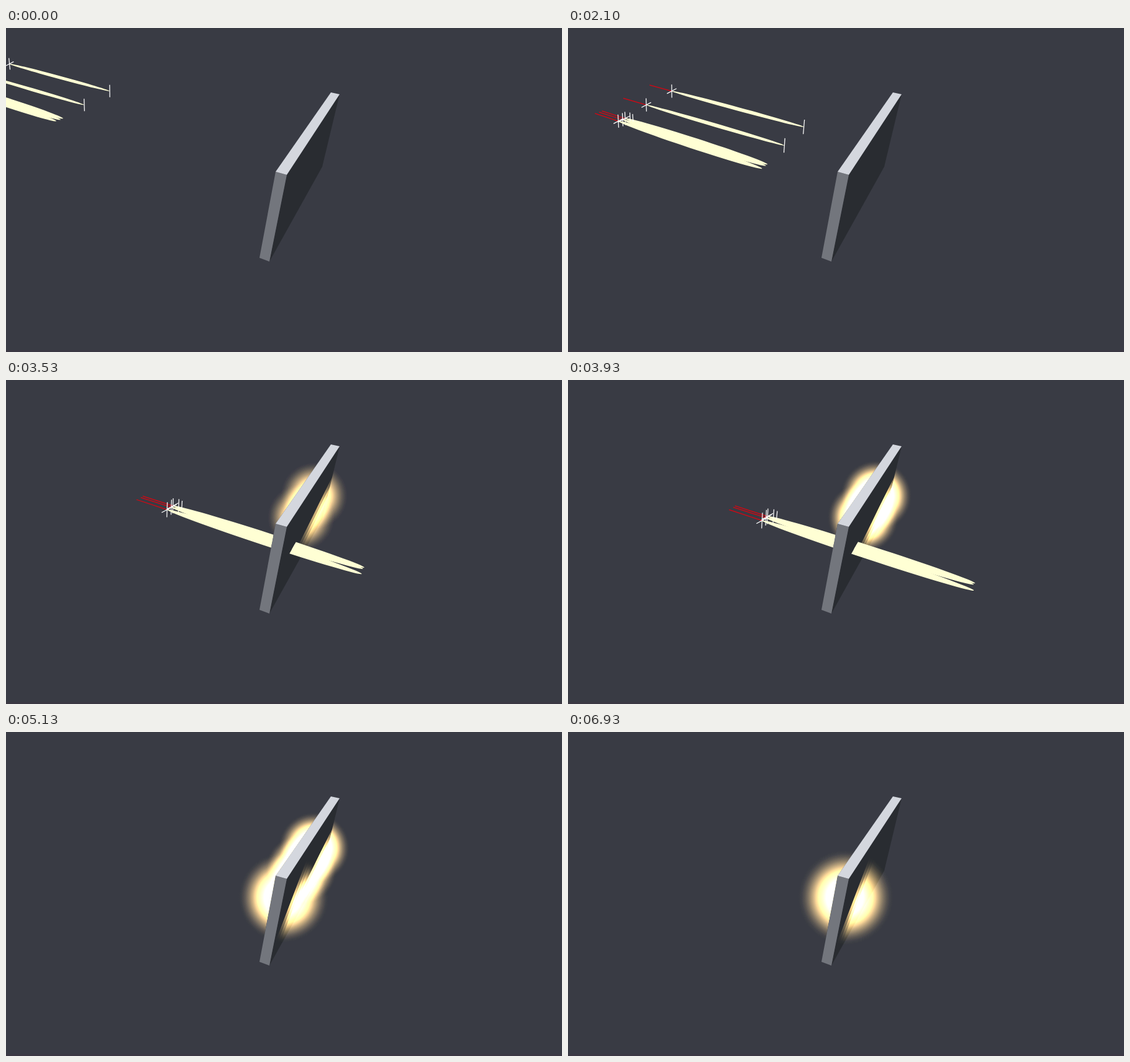
An HTML page with a canvas for the animation above (7910 ms loop, 895 by 523 pixels).

```html
<!DOCTYPE html>
<html lang="en">
<head>
<meta charset="utf-8">
<title>Beams hitting a slab</title>
<style>
  html, body { margin: 0; width: 100%; height: 100%; overflow: hidden; background: #393b44; }
  canvas { display: block; }
</style>
</head>
<body>
<canvas id="stage" width="895" height="523"></canvas>
<script>
const W = 895, H = 523, LOOP = 7910;
const ctx = document.getElementById('stage').getContext('2d');
ctx.lineWidth = 1.25;

// The simulation advances one step at each of these times (ms).
const STEPS = [0, 600, 930, 1300, 1630, 2100, 2470, 2800, 3200, 3530,
  3930, 4300, 4730, 5130, 5500, 5900, 6270, 6630, 6930];

const TOP = [[523, 104], [537, 107], [452, 237], [434, 232]];
const LEFT = [[434, 232], [452, 237], [424, 377], [408, 371]];
const RIGHT = [[452, 237], [537, 107], [509, 224], [424, 377]];
const OUTLINE = [[523, 104], [537, 107], [509, 224], [424, 377], [408, 371], [434, 232]];

// Perspective travel: x(u) = (x0 + v*u) / (1 + c*u), y = y0 + m*(x - x0).
const BEAMS = [
  { x0: 167, v: 32.13, c: -.0274, y0: 101.8, m: .272, h: 2.7, end: 8, tip: true },
  { x0: 126, v: 34.44, c: -.0288, y0: 124.2, m: .294, h: 2.7, end: 8, tip: true },
  { x0: 92, v: 35.76, c: -.0314, y0: 146, m: .323, h: 4.3, end: 12, extra: [8, 12.5] },
  { x0: 88, v: 36.27, c: -.031, y0: 148, m: .322, h: 4.3, end: 12 },
  { x0: 81, v: 36.25, c: -.0321, y0: 150.3, m: .331, h: 4.4, end: 12 }
];
const LENGTH = 5;

// edge: where the glow cuts through the dark face (x, y, dx/dy).
const FLASHES = [
  { x: 496, y: 187, start: 8, size: .76, power: .65, edge: [510, 195, -.5] },
  { x: 475, y: 222, start: 8, size: .76, power: .65, edge: [497, 222, -.5] },
  { x: 447, y: 267, start: 12, size: 1, power: 1, edge: [465, 267, -.38] }
];
const POWER = [6, 4.5, 8.5, 12, 12, 8.5, 4.2, .8];
const RADIUS = [42, 72, 75, 75, 75, 75, 76, 45];
const WARM = [255, 203, 110];

function trace(poly) {
  poly.forEach(([x, y], i) => i ? ctx.lineTo(x, y) : ctx.moveTo(x, y));
  ctx.closePath();
}

function fill(poly, color) {
  ctx.beginPath();
  trace(poly);
  ctx.fillStyle = color;
  ctx.fill();
}

function line(x1, y1, x2, y2, color) {
  ctx.beginPath();
  ctx.moveTo(x1, y1);
  ctx.lineTo(x2, y2);
  ctx.strokeStyle = color;
  ctx.stroke();
}

// Part of a polygon where side(point) < 0.
function cut(poly, side) {
  const out = [];
  poly.forEach((p, i) => {
    const q = poly[(i + 1) % poly.length], a = side(p), b = side(q);
    if (a < 0) out.push(p);
    if (a * b < 0) {
      const t = a / (a - b);
      out.push([p[0] + (q[0] - p[0]) * t, p[1] + (q[1] - p[1]) * t]);
    }
  });
  return out;
}

// Hide whatever lies behind the slab, left of the given edge.
function clipSlab([ex, ey, slope], shift) {
  ctx.beginPath();
  ctx.rect(0, 0, W, H);
  trace(cut(OUTLINE, ([x, y]) => x - (ex + shift + slope * (y - ey))));
  ctx.clip('evenodd');
}

function glow(x, y, radius, power) {
  const g = ctx.createRadialGradient(x, y, 0, x, y, radius), n = 40;
  for (let i = 0; i <= n; i++) {
    const k = power * Math.pow(1 - i / n, 1.7);
    g.addColorStop(i / n, `rgb(${WARM.map(c => Math.min(255, Math.round(c * k)))})`);
  }
  ctx.fillStyle = g;
  ctx.fillRect(x - radius, y - radius, 2 * radius, 2 * radius);
}

function drawFlash(f, step) {
  const age = step - f.start;
  if (age < 0 || age >= POWER.length) return;
  for (const shift of [-4, 0, 4]) {
    ctx.save();
    clipSlab(f.edge, shift);
    ctx.globalCompositeOperation = 'lighter';
    glow(f.x, f.y, RADIUS[age] * f.size, POWER[age] * f.power / 3);
    ctx.restore();
  }
}

function place(b, u) {
  const x = (b.x0 + b.v * u) / (1 + b.c * u);
  return [x, b.y0 + b.m * (x - b.x0)];
}

function tick(x, y, size) {
  const tilt = (x - 190) / 190;
  line(x + tilt, y - size, x - tilt, y + size, '#fff');
}

function drawBeam(b, step) {
  if (step >= b.end) return;
  const [hx, hy] = place(b, step), [tx, ty] = place(b, step - LENGTH);
  const half = b.h / (1 + b.c * (step - 2.5));
  const scale = 1 / (1 + b.c * (step - LENGTH)), size = 10.6 * scale;

  ctx.beginPath();
  ctx.ellipse((hx + tx) / 2, (hy + ty) / 2, Math.hypot(hx - tx, hy - ty) / 2,
    half, Math.atan(b.m), 0, 2 * Math.PI);
  ctx.fillStyle = '#ffffd4';
  ctx.fill();

  if (step) line(...place(b, step - LENGTH - 1), tx, ty, '#dc0410');
  tick(tx, ty, size);
  line(tx - size * .72, ty + size * .38, tx + size * .72, ty - size * .38, '#fff');
  (b.extra || []).forEach(d => tick(tx + d * scale, ty, size * (1.3 - d * .05)));
  if (b.tip) tick(hx, hy, 10 / (1 + b.c * step));
}

function draw(step) {
  ctx.fillStyle = '#393b44';
  ctx.fillRect(0, 0, W, H);
  ctx.fillStyle = '#3b3843';
  ctx.fillRect(0, H - 3, W, 3);
  fill(RIGHT, '#292c31');
  FLASHES.forEach(f => drawFlash(f, step));
  ctx.save();
  clipSlab([462, 270, -.56], 0);
  BEAMS.forEach(b => drawBeam(b, step));
  ctx.restore();
  fill(LEFT, '#73767d');
  fill(TOP, '#d4d7de');
}

const begin = performance.now();
let shown = -1;
function frame() {
  const t = (performance.now() - begin) % LOOP;
  const step = STEPS.filter(s => s <= t).length - 1;
  if (step !== shown) draw(shown = step);
  requestAnimationFrame(frame);
}
frame();
</script>
</body>
</html>
```
